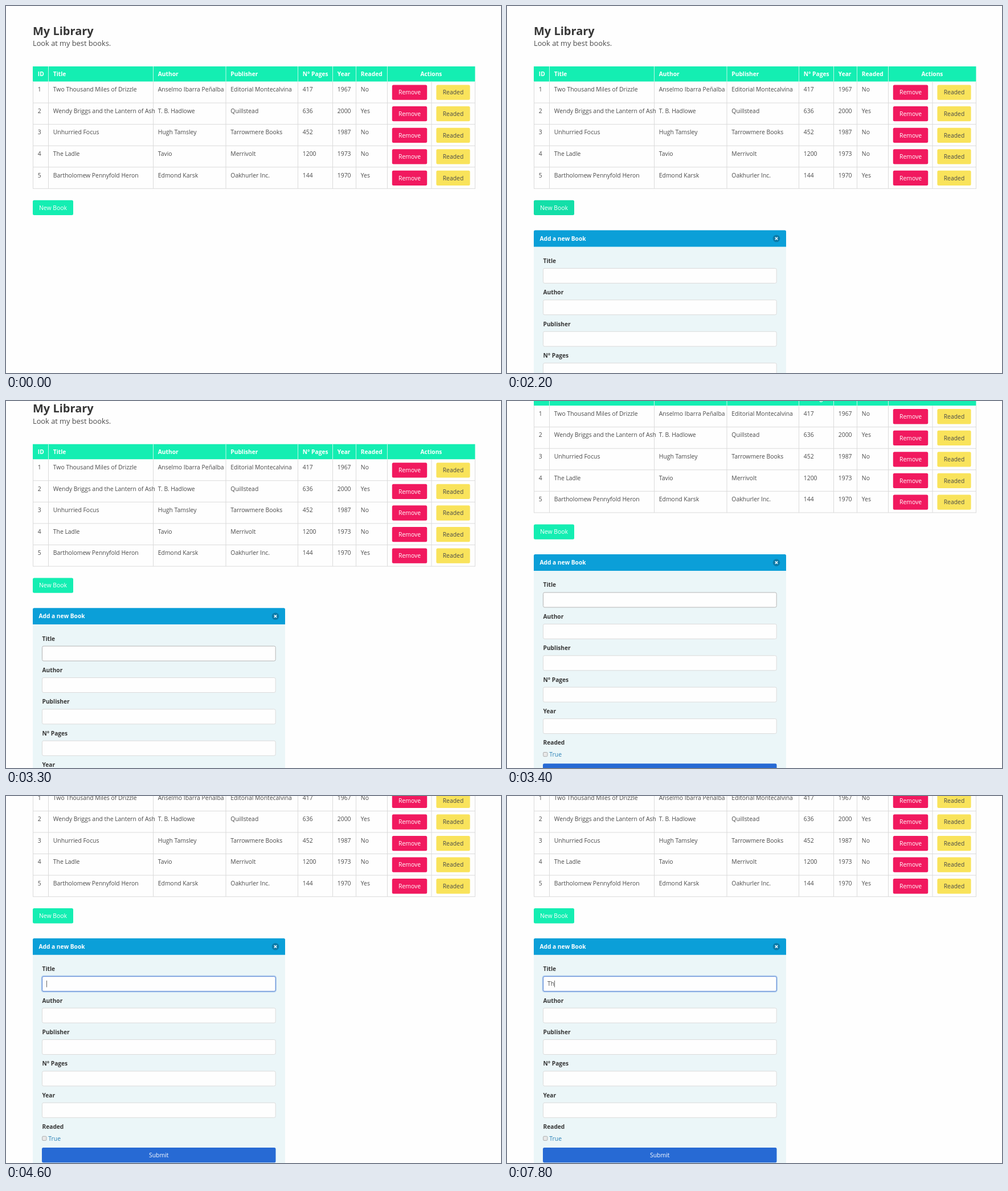
These frames come from a looping animation (869x644 px, 8 s). An HTML page:

```html
<!DOCTYPE html>
<html lang="en">
<head>
<meta charset="utf-8">
<title>My Library</title>
<style>
  html, body { margin: 0; width: 100%; height: 100%; overflow: hidden; background: #fefefe; }
  svg { display: block; }
  text { font: 10.4px "Open Sans", "Noto Sans", sans-serif; fill: #4a4a4a; }
  .bold { font-weight: 700; font-size: 10.2px; fill: #363636; }
  .title { font-weight: 700; font-size: 20px; fill: #363636; }
  .subtitle { font-size: 12.8px; }
  .white { fill: #fff; }
  .link { fill: #277fb5; }
  .middle { text-anchor: middle; }
</style>
</head>
<body>
<svg id="stage" width="869" height="644" viewBox="0 0 869 644"></svg>
<script>
const LOOP = 8000;
const TEAL = '#14eeb2', TEAL_HOVER = '#13dfa8', TEAL_ACTIVE = '#12d5a0';
const LINE = '#dbdbdb';

const books = [
  ['Two Thousand Miles of Drizzle', 'Anselmo Ibarra Peñalba', 'Editorial Montecalvina', 417, 1967, 'No'],
  ['Wendy Briggs and the Lantern of Ash', 'T. B. Hadlowe', 'Quillstead', 636, 2000, 'Yes'],
  ['Unhurried Focus', 'Hugh Tamsley', 'Tarrowmere Books', 452, 1987, 'No'],
  ['The Ladle', 'Tavio', 'Merrivolt', 1200, 1973, 'No'],
  ['Bartholomew Pennyfold Heron', 'Edmond Karsk', 'Oakhurler Inc.', 144, 1970, 'Yes'],
];
const headings = ['ID', 'Title', 'Author', 'Publisher', 'N° Pages', 'Year', 'Readed'];
const columns = [47.5, 74.5, 258.5, 386, 512.5, 573.5, 614.5, 669.5, 747, 823.5];
const tableTop = 106, bodyTop = 132.5, rowHeight = 37.57;
const tableBottom = bodyTop + rowHeight * books.length;

const stage = document.getElementById('stage');

function add(parent, tag, attrs, content = '') {
  const node = document.createElementNS('http://www.w3.org/2000/svg', tag);
  for (const key in attrs) node.setAttribute(key, attrs[key]);
  node.textContent = content;
  return parent.appendChild(node);
}
const rect = (parent, x, y, width, height, fill, rx = 0, extra = {}) =>
  add(parent, 'rect', { x, y, width, height, fill, rx, ...extra });
const line = (parent, d, stroke, width = 1) =>
  add(parent, 'path', { d, stroke, 'stroke-width': width, fill: 'none' });
const label = (parent, x, y, content, style = '') =>
  add(parent, 'text', { x, y, class: style }, content);

function button(parent, x, y, width, fill, content, style) {
  const box = rect(parent, x, y, width, 26.3, fill, 2.5);
  label(parent, x + width / 2, y + 16.9, content, 'middle ' + style);
  return box;
}

const page = add(stage, 'g', {});
label(page, 47, 50.5, 'My Library', 'title');
label(page, 47, 70.4, 'Look at my best books.', 'subtitle');

// Table
rect(page, 47, tableTop, 776.5, bodyTop - tableTop, TEAL);
columns.forEach((x, i) => {
  line(page, `M${x} ${bodyTop}V${tableBottom}`, LINE);
  if (i > 0 && i < 8) line(page, `M${x} ${tableTop}V${bodyTop}`, '#c4f8e8');
});
headings.forEach((text, i) => label(page, columns[i] + 8.3, 123.2, text, 'bold white'));
label(page, 746.5, 123.2, 'Actions', 'bold white middle');
books.forEach((book, row) => {
  const y = bodyTop + row * rowHeight;
  [row + 1, ...book].forEach((text, i) => label(page, columns[i] + 8.3, y + 17.8, text));
  button(page, 677.8, y + 6, 61.4, '#f1195f', 'Remove', 'white');
  button(page, 755.4, y + 6, 59.2, '#f9e35b', 'Readed', '');
  line(page, `M47 ${y + rowHeight}H824`, LINE);
});
const newBook = button(page, 47, 340.8, 71, TEAL, 'New Book', 'white');

// Form panel
const panel = add(page, 'g', {});
rect(panel, 47, 410, 443, 400, '#ebf6f8', 2.5);
add(panel, 'path', { d: 'M47 422.4V396q0-2.5 2.5-2.5H487.5q2.5 0 2.5 2.5V422.4Z', fill: '#0b9fd8' });
label(panel, 57.5, 411.8, 'Add a new Book', 'bold white');
add(panel, 'circle', { cx: 473, cy: 408, r: 6.3, fill: '#0a7aa8' });
line(panel, 'M470.8 405.8l4.4 4.4m0-4.4l-4.4 4.4', '#fff', 1.5);

const glow = rect(panel, 62.5, 459.5, 411.5, 28, 'none', 3.5, { stroke: '#3273dc', 'stroke-opacity': .25, 'stroke-width': 2 });
const fields = ['Title', 'Author', 'Publisher', 'N° Pages', 'Year'].map((text, i) => {
  const y = 447 + i * 55.4;
  label(panel, 63.5, y + 3.9, text, 'bold');
  return rect(panel, 63.5, y + 13.4, 409.7, 26, '#fefefe', 2.5, { stroke: LINE });
});
label(panel, 63.5, 727.6, 'Readed', 'bold');
rect(panel, 63.7, 740.9, 7.2, 7.2, '#e9e9e9', 1.3, { stroke: '#a5a5a5', 'stroke-width': .9 });
label(panel, 74.3, 748.6, 'True', 'link');
button(panel, 63, 760.6, 410.5, '#276ad4', 'Submit', 'white');

const typed = label(panel, 71, 477, '');
const caret = rect(panel, 71, 467.6, .9, 11.6, '#555');

// Each schedule lists [start time, value]; a value holds until the next start.
const at = (schedule, t) => schedule.reduce((value, [start, next]) => t >= start ? next : value, schedule[0][1]);

const scrolls = [[0, 0], [3300, 30.3], [3400, 124.4], [3500, 134.2], [3600, 139], [3700, 142], [3800, 143.7]];
const buttonFills = [[0, TEAL], [1300, TEAL_HOVER], [2100, TEAL_ACTIVE], [2200, TEAL_HOVER], [2800, TEAL]];
const borders = [[0, LINE], [3000, '#b5b5b5'], [4000, LINE], [4200, '#b5b5b5'], [4600, '#4a7bd0']];
const entries = [[0, ''], [6700, 'T'], [7800, 'Th']];
const caretShown = [[0, false], [4600, true], [5200, false], [5800, true], [6400, false], [6700, true], [7300, false], [7800, true]];
const show = (node, visible) => node.setAttribute('visibility', visible ? 'visible' : 'hidden');

function draw(now) {
  const t = now % LOOP;
  page.setAttribute('transform', `translate(0 ${-at(scrolls, t)})`);
  newBook.setAttribute('fill', at(buttonFills, t));
  panel.setAttribute('display', t >= 2200 ? 'inline' : 'none');
  fields[0].setAttribute('stroke', at(borders, t));
  show(glow, t >= 4600);
  typed.textContent = at(entries, t);
  caret.setAttribute('x', 71 + (typed.textContent ? typed.getComputedTextLength() : 0));
  show(caret, at(caretShown, t));
}

const start = performance.now();
function tick() {
  draw(performance.now() - start);
  requestAnimationFrame(tick);
}
tick();
</script>
</body>
</html>
```
